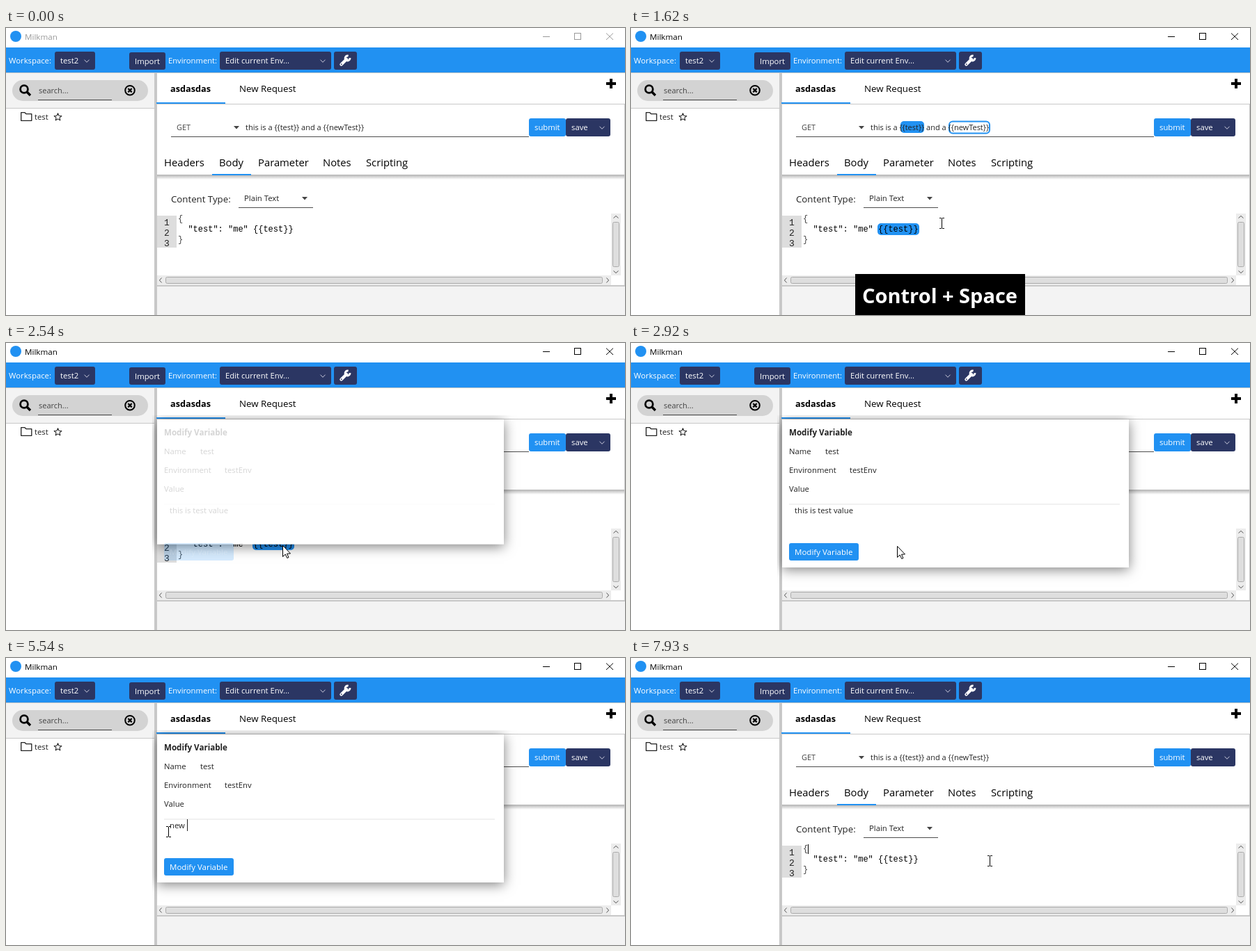
Write an HTML page with a canvas that moves like this. It is 889 px wide and 413 px high and loops after 8000 ms.

```html
<!DOCTYPE html>
<html lang="en">
<head>
<meta charset="utf-8">
<title>Milkman</title>
<style>
  html, body { margin: 0; width: 100%; height: 100%; overflow: hidden; background: #fff; }
  canvas { display: block; width: 889px; height: 413px; }
</style>
</head>
<body>
<canvas id="stage" width="889" height="413"></canvas>
<script>
const ctx = document.getElementById('stage').getContext('2d');
const LOOP = 8000;
const BLUE = '#2191f2', NAVY = '#2b3663', INK = '#222', GREY = '#c8c8c8', PALE = '#f3f3f3';
const SANS = '"Open Sans", "Noto Sans", sans-serif';
const MONO = '"Liberation Mono", monospace';
const BODY = 11.3;

const POPUP = { x: 217, y: 110, w: 498, h: 213, open: 2231, close: 7150 };
const FIELD_X = 235;
const OLD_VALUE = 'this is test value', NEW_VALUE = 'new value';
const KEY_TIMES = [5310, 5390, 5460, 5540, 5690, 5770, 5850, 6000, 6150];
const DRAG = [4230, 4600];
const CLICKS = [[600, 690], [2150, 2225], [3420, 3600], DRAG, [7005, 7085]];

// Pointer path: time, x, y
const PATH = [
  [290, 520, 385], [440, 478, 325], [600, 446, 281], [1620, 446, 281],
  [1850, 418, 287], [2100, 397, 291], [2850, 397, 291], [2920, 382, 292],
  [3060, 360, 301], [3250, 333, 268], [3420, 322, 250], [3690, 321, 249],
  [4230, 321, 249], [4380, 283, 250], [4600, 233, 250], [6600, 233, 250],
  [6780, 262, 277], [6900, 286, 293], [7590, 286, 293], [7760, 408, 297], [7920, 515, 292]
];

const within = (t, [from, to]) => t >= from && t < to;
const clamp = v => Math.min(1, Math.max(0, v));

// Slow start and end with a straight middle
function easeBoth(v) {
  v = clamp(v);
  if (v < 0.2) return 3.125 * v * v;
  if (v > 0.8) return 1 - 3.125 * (1 - v) ** 2;
  return 1.25 * v - 0.125;
}

function rect(x, y, w, h, fill) {
  ctx.fillStyle = fill;
  ctx.fillRect(x, y, w, h);
}

function round(x, y, w, h, r, fill, stroke, width = 1) {
  ctx.beginPath();
  ctx.roundRect(x, y, w, h, r);
  if (fill) { ctx.fillStyle = fill; ctx.fill(); }
  if (stroke) { ctx.strokeStyle = stroke; ctx.lineWidth = width; ctx.stroke(); }
}

function circle(x, y, r, fill) {
  ctx.beginPath();
  ctx.arc(x, y, r, 0, Math.PI * 2);
  ctx.fillStyle = fill;
  ctx.fill();
}

function poly(points, { fill, stroke, width = 1, closed = false }) {
  ctx.beginPath();
  points.forEach(([x, y]) => ctx.lineTo(x, y));
  if (closed) ctx.closePath();
  if (fill) { ctx.fillStyle = fill; ctx.fill(); }
  if (stroke) { ctx.strokeStyle = stroke; ctx.lineWidth = width; ctx.stroke(); }
}

function setFont(size = BODY, weight = 400, family = SANS) {
  ctx.font = `${weight} ${size}px ${family}`;
}

function text(str, x, y, color = INK, size, weight, family) {
  setFont(size, weight, family);
  ctx.fillStyle = color;
  ctx.fillText(str, x, y);
}

function chevron(x, y, dx, dy, color, width = 1) {
  const points = dy ? [[x - 3.5, y - dy], [x, y + dy], [x + 3.5, y - dy]]
                    : [[x - dx, y - 3.5], [x + dx, y], [x - dx, y + 3.5]];
  poly(points, { stroke: color, width });
}

function triangle(x, y) {
  poly([[x - 4, y - 2], [x + 4, y - 2], [x, y + 2.5]], { fill: '#444' });
}

function button(label, x, y, w, h, fill, labelX = x + 8) {
  round(x, y, w, h, 3, fill);
  text(label, labelX, y + 17, '#fff');
}

function titleBar(active) {
  const color = active ? '#000' : '#999';
  circle(14, 12, 8, BLUE);
  text('Milkman', 27, 17, color, 11.6);
  rect(771, 12, 10, 1, color);
  ctx.strokeStyle = color;
  ctx.lineWidth = 1;
  ctx.strokeRect(816.5, 7.5, 9, 9);
  poly([[862, 7.5], [872, 17]], { stroke: color });
  poly([[872, 7.5], [862, 17]], { stroke: color });
}

function wrench() {
  ctx.lineCap = 'round';
  poly([[481.5, 52.5], [489, 45]], { stroke: '#fff', width: 4.4 });
  ctx.lineCap = 'butt';
  ctx.beginPath();
  ctx.arc(490.5, 43.5, 3.4, -0.1, Math.PI * 1.6);
  ctx.strokeStyle = '#fff';
  ctx.lineWidth = 3;
  ctx.stroke();
  circle(481.8, 52.2, 0.9, NAVY);
}

function toolBar() {
  rect(0, 28, 889, 37, BLUE);
  text('Workspace:', 4, 51, '#fff');
  button('test2', 70, 34, 58, 26, NAVY);
  chevron(116, 47.5, 0, 1.8, '#ccd');
  button('Import', 177, 35, 52, 25, NAVY);
  text('Environment:', 233, 51, '#fff', 11.2);
  button('Edit current Env...', 307, 34, 160, 26, NAVY);
  chevron(455, 47.5, 0, 1.8, '#ccd');
  round(471, 34, 33, 26, 3, NAVY);
  wrench();
}

function sidePanel() {
  rect(0, 65, 213, 50, PALE);
  rect(0, 64, 889, 1, GREY);
  rect(0, 115, 213, 1, GREY);
  round(9, 75, 195, 30, 15, '#d3d3d3');
  ctx.beginPath();
  ctx.arc(26, 88, 5.4, 0, Math.PI * 2);
  ctx.strokeStyle = '#000';
  ctx.lineWidth = 2.8;
  ctx.stroke();
  poly([[29.8, 91.8], [35, 97]], { stroke: '#000', width: 3.4 });
  text('search...', 47, 94, '#444', 11);
  rect(46, 103, 106, 1, '#4d4d4d');
  ctx.beginPath();
  ctx.arc(178, 89.7, 6.8, 0, Math.PI * 2);
  ctx.strokeStyle = '#000';
  ctx.lineWidth = 2;
  ctx.stroke();
  poly([[175.3, 87], [180.7, 92.4]], { stroke: '#000', width: 2.2 });
  poly([[180.7, 87], [175.3, 92.4]], { stroke: '#000', width: 2.2 });

  ctx.lineJoin = 'round';
  poly([[21.7, 121.7], [27, 121.7], [29, 123.7], [36.8, 123.7], [36.8, 133.3], [21.7, 133.3]],
    { stroke: INK, width: 1.3, closed: true });
  text('test', 41, 132);
  const star = Array.from({ length: 10 }, (_, i) => {
    const r = i % 2 ? 2.6 : 5.6, a = i * Math.PI / 5 - Math.PI / 2;
    return [74.5 + r * Math.cos(a), 128.3 + r * Math.sin(a)];
  });
  poly(star, { stroke: INK, width: 1.1, closed: true });
  ctx.lineJoin = 'miter';
  rect(213, 65, 4, 348, GREY);
}

function requestTabs() {
  text('asdasdas', 236, 92, '#000', 12.7, 700);
  text('New Request', 335, 92, '#000', 13.3);
  rect(217, 109, 672, 1, GREY);
  rect(216, 107, 99, 2, BLUE);
  rect(862, 78, 14, 4, '#000');
  rect(867, 73, 4, 14, '#000');
}

function requestBar(highlight) {
  text('GET', 245, 147, '#444', 10.9);
  triangle(331, 143);
  rect(237, 156, 514, 1, '#4d4d4d');
  if (highlight) {
    round(387, 134, 34, 17, 5, BLUE);
    round(457, 134.5, 58, 17, 5, '#fff', BLUE, 2);
  }
  text('this is a {{test}} and a {{newTest}}', 344, 147, INK, 11);
  button('submit', 751, 130, 53, 26, BLUE);
  button('save', 804, 130, 64, 26, NAVY);
  chevron(856, 143.5, 0, 1.8, '#ccd');

  const tabs = [['Headers', 227], ['Body', 306], ['Parameter', 362], ['Notes', 455], ['Scripting', 517]];
  tabs.forEach(([label, x]) => text(label, x, 199, '#000', 14.8));
  const shade = ctx.createLinearGradient(0, 211, 0, 218);
  shade.addColorStop(0, 'rgba(0,0,0,.3)');
  shade.addColorStop(1, 'rgba(0,0,0,0)');
  rect(217, 211, 671, 7, shade);
  rect(296, 210, 56, 2, BLUE);
  rect(888, 110, 1, 260, GREY);
}

function scrollBars() {
  rect(869, 267, 14, 89, '#ececec');
  round(871.5, 279.5, 9, 64, 2, '#dedede', '#aaa');
  chevron(876, 272, 0, -1.6, '#555');
  chevron(876, 351, 0, 1.6, '#555');
  rect(217, 356, 652, 14, '#ececec');
  round(229.5, 358.5, 627, 9, 2, '#dedede', '#aaa');
  chevron(222, 363, -1.6, 0, '#555');
  chevron(864, 363, 1.6, 0, '#555');
}

function editor(highlight, caret) {
  text('Content Type:', 237, 251, INK, 13.25);
  text('Plain Text', 342, 249, INK, 11.3);
  triangle(429, 245);
  rect(334, 258, 107, 1, '#4d4d4d');

  rect(217, 270, 28, 46, '#ddd');
  if (highlight) round(354, 281, 60, 17, 5, BLUE);
  ['{', '  "test": "me" {{test}}', '}'].forEach((line, i) => {
    text(i + 1, 227, 284 + i * 15, '#222', 13, 400, MONO);
    text(line, 247, 278 + i * 15, i === 1 ? '#000' : '#444', 12, 400, MONO);
  });
  if (caret) rect(254, 268, 1, 14, '#000');
  scrollBars();
  rect(217, 370, 672, 2, GREY);
  rect(217, 372, 672, 41, PALE);
}

function fieldValue(t) {
  if (t < KEY_TIMES[0]) return OLD_VALUE;
  return NEW_VALUE.slice(0, KEY_TIMES.filter(k => k <= t).length);
}

function prefixEdge(str, count) {
  return FIELD_X + ctx.measureText(str.slice(0, count)).width;
}

// Left edge of the selection, snapped to the nearest letter gap
function selectionStart(pointerX) {
  let best = FIELD_X;
  for (let i = 0; i <= OLD_VALUE.length; i++) {
    const edge = prefixEdge(OLD_VALUE, i);
    if (Math.abs(edge - pointerX) < Math.abs(best - pointerX)) best = edge;
  }
  return best;
}

function valueField(t, pointer) {
  const value = fieldValue(t);
  rect(227, 231, 475, 2, '#f1f1f1');
  text(value, FIELD_X, 245);
  const end = prefixEdge(value, value.length);
  const caretAt = x => rect(Math.round(x), 232, 1, 17, '#222');

  if (within(t, [DRAG[0], KEY_TIMES[0]])) {
    const start = selectionStart(pointer.x);
    ctx.save();
    ctx.beginPath();
    ctx.rect(start, 232, end - start, 17);
    ctx.clip();
    rect(start, 232, end - start, 17, '#0096c9');
    text(value, FIELD_X, 245, '#fff');
    ctx.restore();
    if (t >= DRAG[1] && t < 5080) caretAt(FIELD_X - 1);
  } else if (within(t, [3000, 3420])) {
    caretAt(FIELD_X - 1);
  } else if (within(t, [3420, 3770]) || within(t, [KEY_TIMES[0], 6630])) {
    caretAt(end);
  }
}

function popup(t, pointer) {
  const { x, y, w, h, open, close } = POPUP;
  if (!within(t, [open, close])) return;
  const age = t - open;
  ctx.save();
  ctx.beginPath();
  ctx.rect(210, 104, 679, 309);
  ctx.clip();
  ctx.shadowColor = 'rgba(0,0,0,.5)';
  ctx.shadowBlur = 17;
  ctx.shadowOffsetY = 3;
  rect(x, y, w * easeBoth(age / 280), h * easeBoth(age / 400), '#fff');
  ctx.restore();

  const alpha = easeBoth((age - 280) / 120);
  if (!alpha) return;
  ctx.save();
  ctx.globalAlpha = alpha;
  text('Modify Variable', 227, 133, INK, 11.6, 700);
  text('Name', 227, 160);
  text('test', 279, 160);
  text('Environment', 227, 187);
  text('testEnv', 314, 187);
  text('Value', 227, 214);
  valueField(t, pointer);
  round(227, 288, 100, 25, 3, BLUE);
  text('Modify Variable', 235, 305, '#fff', 11.5);
  ctx.restore();
}

function keyOverlay() {
  rect(322, 354, 244, 59, '#000');
  text('Control + Space', 332, 396, '#fff', 29, 700);
}

function pointerAt(t) {
  const i = PATH.findIndex(p => p[0] > t);
  if (i < 0) { const [, x, y] = PATH[PATH.length - 1]; return { x, y }; }
  if (i === 0) return null;
  const [t0, x0, y0] = PATH[i - 1], [t1, x1, y1] = PATH[i];
  const k = (t - t0) / (t1 - t0);
  return { x: x0 + (x1 - x0) * k, y: y0 + (y1 - y0) * k };
}

function overText({ x, y }, t, highlight) {
  if (within(t, [POPUP.open, POPUP.close])) return y > 231 && y < 258;
  const onVariable = highlight && x > 354 && x < 414 && y > 281 && y < 298;
  return y > 262 && y < 356 && x > 245 && !onVariable;
}

function drawPointer(pointer, isText) {
  ctx.save();
  ctx.translate(Math.round(pointer.x), Math.round(pointer.y));
  if (isText) {
    rect(0, -7, 1, 14, '#000');
    for (const y of [-8, 7]) {
      rect(-3, y, 3, 1, '#000');
      rect(1, y, 3, 1, '#000');
    }
  } else {
    poly([[0.5, 0.5], [0.5, 16.5], [4.2, 13], [6.8, 18.5], [9, 17.5], [6.5, 12.2], [11.5, 12]],
      { fill: '#fff', stroke: '#000', closed: true });
  }
  ctx.restore();
}

function draw(t) {
  const pointer = pointerAt(t);
  const highlight = within(t, [1185, 2900]);
  rect(0, 0, 889, 413, '#fff');
  titleBar(t >= 600);
  toolBar();
  sidePanel();
  requestTabs();
  requestBar(highlight);
  editor(highlight, within(t, [600, 1150]) || t >= 7620);
  popup(t, pointer);
  if (within(t, [1150, 1690])) keyOverlay();
  if (!pointer) return;
  if (CLICKS.some(span => within(t, span))) {
    circle(pointer.x - 3, pointer.y - 3, 11.5, 'rgba(255,232,0,.7)');
  }
  drawPointer(pointer, overText(pointer, t, highlight));
}

const begin = performance.now();
function tick() {
  draw((performance.now() - begin) % LOOP);
  requestAnimationFrame(tick);
}
tick();
</script>
</body>
</html>
```
